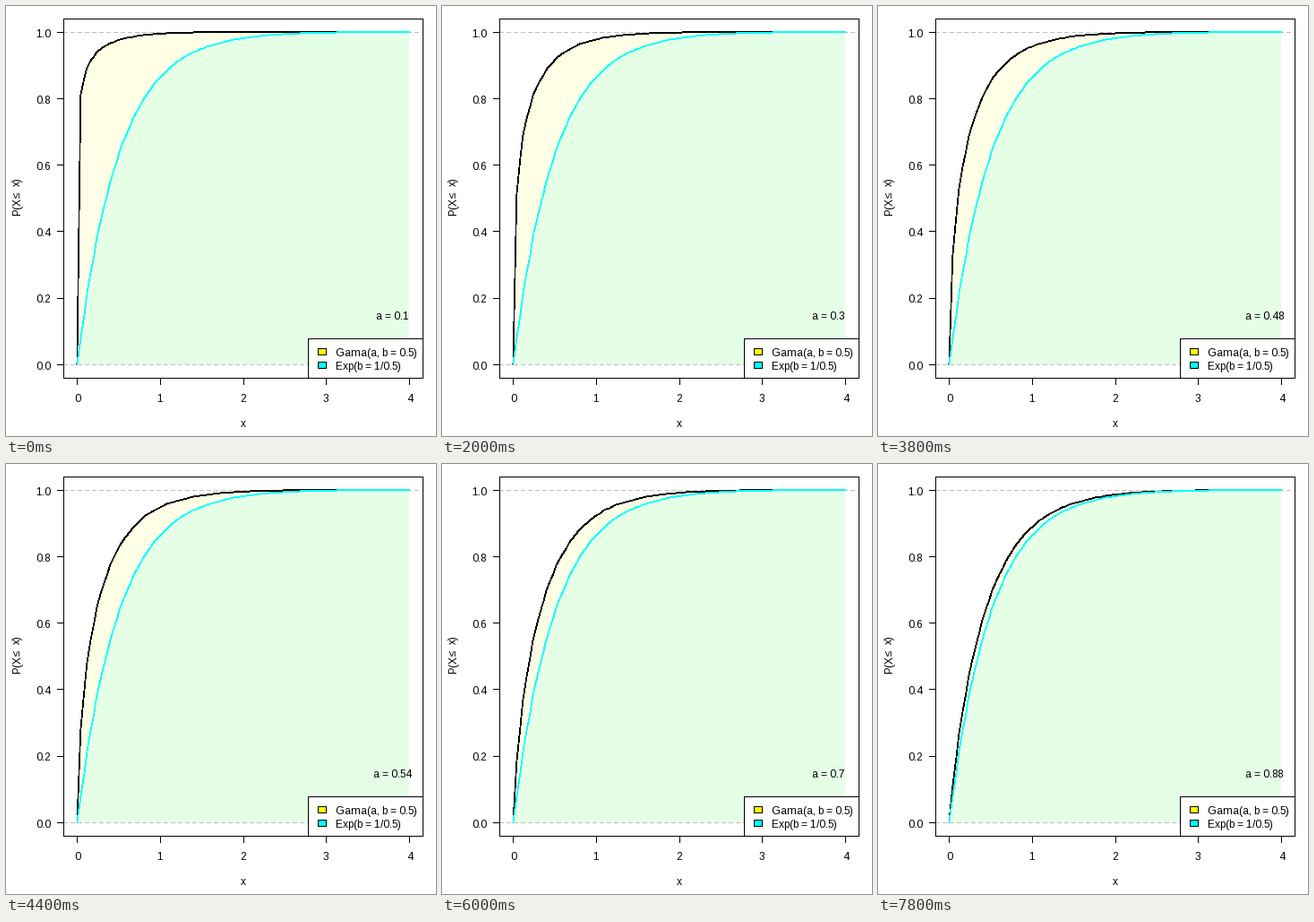
A matplotlib script for the animation above (8 s loop, 480 by 480 pixels).

```python
import math

import matplotlib.pyplot as plt
import numpy as np
from matplotlib.animation import FuncAnimation
from matplotlib.patches import Polygon, Rectangle

SIZE, DPI = 480, 96
FRAMES, INTERVAL = 40, 200
PX = 72 / DPI  # one pixel in points

plt.rcParams.update({
    "font.family": "Liberation Sans",
    "font.size": 12 * PX,
    "text.hinting": "force_autohint",
    "text.hinting_factor": 1,
    "text.kerning_factor": 0,
    "path.simplify": False,
    "path.snap": False,
})

# Plot region in pixels and the scale of both axes
LEFT, TOP, RIGHT, BOTTOM = 64, 14, 465, 415
X0, X_UNIT = 79.64, 92.78
Y0, Y_UNIT = 400.36, 371.11

# Without antialiasing every touched pixel is filled, so a thin
# stroke just off the pixel edge comes out two pixels wide.
CURVE_WIDTH, CURVE_SHIFT = 0.72, 0.35


def px(x):
    return np.floor(X0 + X_UNIT * np.asarray(x))


def py(y):
    return np.floor(Y0 - Y_UNIT * np.asarray(y))


def gamma_cdf(x, shape, scale=0.5):
    """Regularised lower incomplete gamma function as a power series."""
    z = x / scale
    total = sum(z ** k / math.gamma(shape + k + 1) for k in range(60))
    return np.clip(z ** shape * np.exp(-z) * total, 0, 1)


fig = plt.figure(figsize=(SIZE / DPI, SIZE / DPI), dpi=DPI, facecolor="white")
ax = fig.add_axes([0, 0, 1, 1])
ax.set_xlim(0, SIZE)
ax.set_ylim(SIZE, 0)
ax.axis("off")


def line(xs, ys, color="black", width=1, **kw):
    return ax.plot(xs, ys, color=color, lw=width * PX, antialiased=False,
                   snap=False, **kw)[0]


def curve(ys, color, z):
    return line(xs + CURVE_SHIFT, ys + CURVE_SHIFT, color, CURVE_WIDTH,
                solid_capstyle="round", solid_joinstyle="round", zorder=z)


def box(x1, y1, x2, y2, fill, z):
    ax.add_patch(Rectangle((x1 + 0.5, y1 + 0.5), x2 - x1, y2 - y1,
                           facecolor=fill, edgecolor="black", lw=PX,
                           antialiased=False, snap=False, zorder=z))


def area(points, color):
    return ax.add_patch(Polygon(points, facecolor=color, alpha=0.1, lw=0,
                                antialiased=False, snap=False, zorder=2))


def label(x, y, text, **kw):
    return ax.text(x, y, text, ha="left", va="baseline", zorder=8, **kw)


def under(ys):
    """Outline of the region between a curve and the x axis."""
    corners = [(xs[-1], py(0)), (xs[0], py(0))]
    return np.vstack([np.column_stack([xs, ys]), corners])


grid = np.linspace(0, 4, 101)
xs = px(grid)
exp_ys = py(1 - np.exp(-2 * grid))

for level in (0, 1):
    y = py(level) + 0.5
    line([LEFT + 0.1, RIGHT + 0.9], [y, y], "#bebebe", dashes=(4.8, 3.2),
         dash_capstyle="butt", zorder=1)

gamma_area = area(under(exp_ys), "yellow")
area(under(exp_ys), "cyan")
gamma_line = curve(exp_ys, "black", 3)
curve(exp_ys, "cyan", 4)

# Frame, ticks and axis labels
box(LEFT, TOP, RIGHT, BOTTOM, "none", 5)
for v in range(5):
    x = px(v) + 0.5
    line([x, x], [BOTTOM + 0.5, BOTTOM + 7.5], zorder=5)
    label(math.floor(X0 + X_UNIT * v - 3.5), 442, str(v))
for k in range(6):
    y = py(k / 5) + 0.5
    line([LEFT - 6.5, LEFT + 0.5], [y, y], zorder=5)
    label(33, math.floor(Y0 - Y_UNIT * k / 5 + 4.8) + 1, f"{k / 5:.1f}")

label(262, 470, "x")
for y, part in ((234, "P(X"), (214, "\u2264"), (201, "x)")):
    label(16, y, part, rotation=90, rotation_mode="anchor")

# Legend
box(337, 371, RIGHT, BOTTOM, "white", 6)
for y, color, text in ((382, "yellow", "Gama(a, b = 0.5)"),
                       (397, "cyan", "Exp(b = 1/0.5)")):
    box(348, y, 357, y + 7, color, 7)
    label(368, y + 9, text)

shape_label = label(413, 350, "")


def update(i):
    a = round(0.1 + 0.02 * i, 2)
    ys = py(gamma_cdf(grid, a))
    gamma_line.set_ydata(ys + CURVE_SHIFT)
    gamma_area.set_xy(under(ys))
    text = f"a = {a:g}"
    shape_label.set_text(text)
    shape_label.set_x(413 if len(text) == 7 else 410)
    return gamma_line, gamma_area, shape_label


anim = FuncAnimation(fig, update, frames=FRAMES, interval=INTERVAL,
                     repeat=True, repeat_delay=0, blit=False)
plt.show()
```
